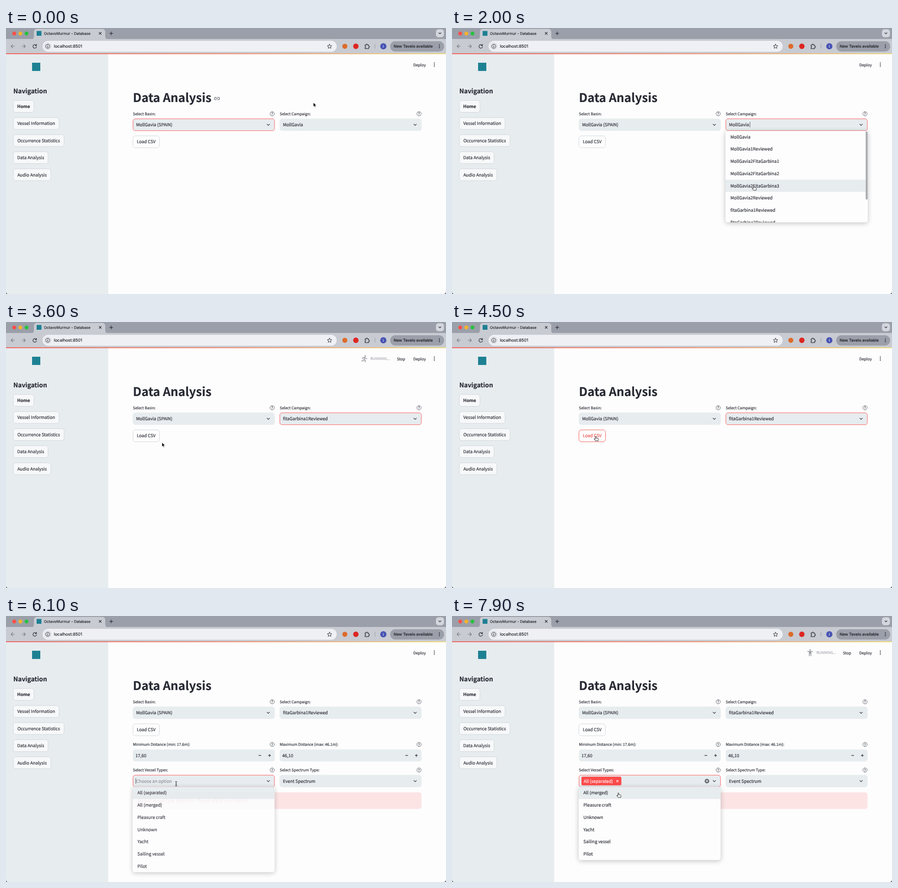
Write an HTML page that moves like this. It is 962 px wide and 582 px high and loops after 8000 ms.

```html
<!DOCTYPE html>
<html lang="en">
<head>
<meta charset="utf-8">
<title>Data Analysis</title>
<style>
html, body { margin: 0; width: 100%; height: 100%; overflow: hidden; background: #55585c; }
svg { display: block; width: 962px; height: 582px; }
text { font: 9.56px "Noto Sans CJK JP", "Noto Sans CJK SC", "Noto Sans CJK", "Noto Sans", sans-serif; color: #272933; fill: currentColor; stroke: currentColor; stroke-width: .18; text-rendering: geometricPrecision; white-space: pre; }
.ui { font-family: Inter, Roboto, sans-serif; color: #222429; }
.small { font-size: 8.36px; }
.line { fill: none; stroke: #292b35; stroke-width: 1.2; stroke-linecap: round; stroke-linejoin: round; }
.shadow { filter: drop-shadow(0 2.7px 5.3px rgba(0, 0, 0, .24)); }
</style>
</head>
<body>
<svg viewBox="0 0 962 582">
  <defs>
    <linearGradient id="bar"><stop stop-color="#f2504b"/><stop offset=".5" stop-color="#ee7b58"/><stop offset="1" stop-color="#e8d470"/></linearGradient>
    <clipPath id="list"><rect x="598" y="225" width="311" height="200.3" rx="5"/></clipPath>
  </defs>
  <g id="base"></g>
  <g id="live"></g>
</svg>
<script>
const LOOP = 8000, ROW = 26.7, GREY = '#e7ecef', RED = '#ff4b4b', LEFT = 277.5, RIGHT = 598.5;
const base = document.getElementById('base'), live = document.getElementById('live');

const PLACE = 'MollGavia', RACE = 'fitaGarbina1Reviewed';
const campaigns = [PLACE, PLACE + '1Reviewed', ...[1, 2, 3].map(n => PLACE + '2FitaGarbina' + n),
  PLACE + '2Reviewed', RACE, 'fitaGarbina2Reviewed'];
const vessels = ['All (separated)', 'All (merged)', 'Pleasure craft', 'Unknown', 'Yacht', 'Sailing vessel', 'Pilot'];

// Moments of the session, in ms
const OPEN_A = 600, PICK_A = 2900, HOVER = 3900, LOADED = 4900, OPEN_B = 5900, PICK_B = 7400;

const rect = (x, y, w, h, fill, r = 0, more = '') =>
  `<rect x="${x}" y="${y}" width="${w}" height="${h}" rx="${r}" fill="${fill}" ${more}/>`;
const circle = (x, y, r, fill, more = '') => `<circle cx="${x}" cy="${y}" r="${r}" fill="${fill}" ${more}/>`;
const text = (x, y, s, more = '') => `<text x="${x}" y="${y}" ${more}>${s}</text>`;
const line = (d, more = '') => `<path class="line" d="${d}" ${more}/>`;
const group = (body, more) => `<g ${more}>${body}</g>`;
const ink = c => `style="color:${c}"`;
const size = (px, weight = 400) => `style="font-size:${px}px;font-weight:${weight}"`;
const cross = (x, y, r, more) => line(`M${x - r} ${y - r}l${2 * r} ${2 * r}m0 ${-2 * r}l${-2 * r} ${2 * r}`, more);
const chevron = (x, y, r = 2.8) => line(`M${x - r} ${y - r / 2}l${r} ${r}l${r} ${-r}`, 'stroke-width="1.5"');
const dots = (x, y, gap) => [-gap, 0, gap].map(d => circle(x, y + d, 1.1, '#292b35')).join('');
const edge = (c, w = .9) => `stroke="${c}" stroke-width="${w}"`;
const fade = (t, start, span) => Math.max(0, Math.min(1, (t - start) / span));

const label = (x, y, s) => text(x, y + 3.1, s, 'class="small"') +
  circle(x + 304.5, y, 4.6, 'none', edge('#50535d')) +
  text(x + 304.5, y + 2.8, '?', `text-anchor="middle" ${size(7)}`);

const select = (x, y, s, focus, color = '#272933') =>
  rect(x + .2, y + .2, 309.4, 26, GREY, 5, edge(focus ? RED : GREY)) +
  text(x + 7, y + 16.7, s, ink(color)) + chevron(x + 296, y + 13.2);

const number = (x, y, s) => rect(x, y, 310, 26.3, GREY, 5.3) + text(x + 5.5, y + 16.5, s) +
  line(`M${x + 275} ${y + 13.2}h5M${x + 296.2} ${y + 13.2}h5m-2.5 -2.5v5`, 'stroke-width="1.4"');

const button = (x, y, w, s, color, weight = 400, bg = '#f7f8f9') =>
  rect(x, y, w, 26, bg, 5.3, edge(color || '#cdd2d7')) +
  text(x + w / 2, y + 16.4, s, `text-anchor="middle" style="font-weight:${weight};color:${color || '#272933'}"`);

function browser() {
  return rect(0, 0, 962, 30, '#9b9fa9') + rect(0, 24, 962, 31.6, '#c8cbd2') +
    ['#fb4f49', '#fdb32b', '#27c13f'].map((c, i) => circle(18 + 13.4 * i, 12, 4.2, c)).join('') +
    '<path fill="#c8cbd2" d="M55 24.5q6 0 6-6V9q0-7 7-7H210q7 0 7 7v9.5q0 6 6 6z"/>' +
    rect(67, 6.5, 10.5, 10.5, '#1d7f93') +
    text(83, 14.6, 'OctavoMurmur - Database', `class="ui" ${size(8.1)}`) +
    cross(206, 11.8, 2.3) + line('M226.5 11.8h7m-3.5 -3.5v7') +
    rect(940, 2.7, 17.5, 17.5, '#d3d6dc', 5.5) + chevron(948.7, 11.7, 2.4) +
    line('M18.5 40h-7.5m3.5-3.5l-3.5 3.5l3.5 3.5', 'style="stroke:#777b84"') +
    line('M35 40h7.5m-3.5-3.5l3.5 3.5l-3.5 3.5', 'style="stroke:#777b84"') +
    line('M66.2 38.2a3.9 3.9 0 1 0 .5 2.8M66.6 35.6v3h-3') +
    rect(80, 28, 643, 24, '#eff0f4', 12) + circle(91.3, 40, 8.3, '#e0e2e8') +
    circle(91.3, 40, 4.5, 'none', edge('#33363d', 1)) + line('M91.3 39.8v2.4M91.3 37.7v.1') +
    text(104.7, 43.3, 'localhost:8501', `class="ui" ${size(9.1)}`) +
    line('M707.4 35.3l1.4 3.1 3.4.4-2.5 2.3.7 3.4-3-1.7-3 1.7.7-3.4-2.5-2.3 3.4-.4z', 'style="stroke-width:1"') +
    circle(740.8, 40, 5.5, '#dc6b2b') + circle(764.9, 40, 5.9, '#dd2622') +
    line('M785 37.2h2.4v-.6a1.4 1.4 0 0 1 2.8 0v.6h2.6v2.6h.6a1.4 1.4 0 0 1 0 2.8h-.6v2.6H785v-2.6a1.4 1.4 0 0 0 0-2.8z') +
    rect(806.3, 35, 1, 10, '#979ba5') + circle(825, 40, 6.8, '#4753b2') +
    text(825, 42.8, 'i', 'class="ui" text-anchor="middle" style="font-size:8px;color:#fff"') +
    rect(840, 29, 118, 22.5, '#9b9fa9', 11.2) +
    text(847.6, 43.1, 'New Tavelo available', `class="ui" ${size(8.5, 500)}`) + dots(947.5, 40, 3.2);
}

function page() {
  const nav = [['Home', 45], ['Vessel Information', 100], ['Occurrence Statistics', 111], ['Data Analysis', 76], ['Audio Analysis', 82]];
  return '<path fill="#fdfdfd" d="M0 55H962V576q0 6-6 6H6q-6 0-6-6z"/>' +
    `<path fill="${GREY}" d="M0 55H223.5V582H6q-6 0-6-6z"/>` + browser() +
    rect(0, 55.4, 962, 1.8, 'url(#bar)') + rect(57, 76, 18, 18, '#1d8193') +
    text(16, 143.2, 'Navigation', size(13.75, 700)) +
    nav.map(([s, w], i) => button(16, 158.5 + 37.4 * i, w, s, '', i ? 400 : 700)).join('') +
    text(890.5, 83.6, 'Deploy', 'class="small"') + dots(936.5, 80, 3.4) +
    text(277.5, 161.7, 'Data Analysis', size(26.2, 700)) +
    label(LEFT, 187.6, 'Select Basin:') + label(RIGHT, 187.6, 'Select Campaign:');
}

function runner(t) {
  const stands = t < 3400 || t > 7600;
  const body = stands
    ? 'M777.8 77.6h10.4M783 78v4M781.3 78v9M784.7 78v9'
    : 'M784.6 77l-1.8 5M784.6 77l-4 .8-1.2 2.6M784.8 77.4l1.6 2.4 2.6.4M782.8 82l2.6 2v3.2M782.6 82.4l-1.4 2.6-3.6.2';
  return circle(stands ? 783 : 785.6, 74.3, 1.6, '#9a9ca3') +
    line(body, 'style="stroke:#9a9ca3;stroke-width:1.7"') +
    text(796.7, 83.4, 'RUNNING...', 'style="font-size:8.1px;color:#a6a8af"') + text(854.8, 83.6, 'Stop', 'class="small"');
}

function status(t) {
  const shown = t < 4300 ? fade(t, 3100, 300) * (1 - fade(t, 3700, 300))
    : t < 6000 ? fade(t, 4600, 200) * (1 - fade(t, 4900, 450))
    : fade(t, 7500, 300);
  return shown ? group(runner(t), `opacity="${shown}"`) : '';
}

function menu(x, y, w, h, items, pad, hover, opacity, extra = {}) {
  const rows = items.map((s, i) => (i === hover ? rect(x, y + ROW * i, w, ROW, GREY) : '') +
    text(x + pad, y + ROW * i + 16.7, s)).join('');
  const panel = rect(x, y, extra.width || w, h, '#fdfdfd', 5, 'class="shadow"');
  return group(panel + group(rows + (extra.bar || ''), extra.clip || ''), `opacity="${opacity}"`);
}

const track = [[0, 672, 163], [500, 658, 214], [1300, 658, 214], [2000, 660, 345], [2500, 661, 397], [2900, 661, 397],
  [3600, 341, 263.5], [4000, 314.5, 250], [5200, 314.5, 250], [5850, 372, 367], [6250, 372, 367], [6700, 364, 387], [LOOP, 364, 387]];
const kinds = [[0, 'arrow'], [400, 'beam'], [1500, 'hand'], [2950, 'arrow'], [3900, 'hand'], [5300, 'arrow'], [5750, 'beam'], [6350, 'hand']];
const shapes = {
  arrow: '<path d="M0 0V9.4L2.2 7.4L3.7 10.8L5.3 10.1L3.8 6.8H6.7Z" fill="#000" stroke="#fff" stroke-width=".8"/>',
  beam: line('M-1.9-4.8Q0-4.8 0-3.4Q0-4.8 1.9-4.8M0-3.4V3.8M-1.9 5.2Q0 5.2 0 3.8Q0 5.2 1.9 5.2M-1 .9h2', 'style="stroke-width:1"'),
  hand: '<path d="M-1.2.6Q-.2-.8.8.6V4l3.8.8q1.2.4 1 1.8l-.8 3.4H-.8l-3-3.8q0-1.4 1.4-.6l1.2.9z" fill="#fff" stroke="#111" stroke-width=".9" stroke-linejoin="round"/>'
};

function pointer(t) {
  const i = track.findIndex(k => k[0] > t);
  const [t0, x0, y0] = track[i - 1], [t1, x1, y1] = track[i];
  const u = (t - t0) / (t1 - t0), e = u * u * (3 - 2 * u);
  return { x: x0 + (x1 - x0) * e, y: y0 + (y1 - y0) * e };
}

function scene(t) {
  const p = pointer(t);
  const openA = t >= OPEN_A && t < PICK_A, openB = t >= OPEN_B, picked = t >= PICK_B;
  const hot = t >= HOVER && t < OPEN_B;
  const hover = top => Math.max(0, Math.floor((p.y - top) / ROW));
  const caret = (x, y, since) => (t - since) % 1000 < 500 ? rect(x, y, .8, 12, '#292b35') : '';
  let out = status(t);

  if (p.y < 174) {
    out += line('M460 151.6h-1.8a2.6 2.6 0 0 0 0 5.2h1.8M462.6 151.6h1.8a2.6 2.6 0 0 1 0 5.2h-1.8M459 154.2h4.6', 'style="stroke:#6c6f78"');
  }
  out += select(LEFT, 198.5, PLACE + ' (SPAIN)', t < OPEN_A) +
    select(RIGHT, 198.5, t < PICK_A ? PLACE : RACE, t >= OPEN_A && t < 4600) +
    button(LEFT, 236, 58, 'Load CSV', hot ? '#f04845' : '', 400, '#fdfdfd');

  if (t >= LOADED) {
    out += label(LEFT, 281, 'Minimum Distance (min: 17.6m):') + label(RIGHT, 281, 'Maximum Distance (max: 46.1m):') +
      number(LEFT, 292, '17,60') + number(RIGHT, 292, '46,10') +
      label(LEFT, 337, 'Select Vessel Types:') + label(RIGHT, 337, 'Select Spectrum Type:') +
      select(LEFT, 348, picked ? '' : 'Choose an option', openB, '#8c9098') + select(RIGHT, 348, 'Event Spectrum') +
      group(rect(LEFT, 385.7, 631, 36.5, '#fce4e5', 5.3) +
        text(288, 407.4, 'Invalid vessel type selection. Please adjust your inputs.', ink('#7d353b')),
        `opacity="${fade(t, 4750, 500)}"`);
  }
  if (openA) {
    out += caret(650.9, 205.5, OPEN_A) + menu(598, 225, 306.5, 200.3, campaigns, 10.7, hover(225), fade(t, 500, 250), {
      width: 311, clip: 'clip-path="url(#list)"',
      bar: t >= 900 ? rect(904.5, 226, 4.2, 149.5, '#a9abae', 2) : ''
    });
  }
  if (openB) {
    const items = vessels.slice(picked ? 1 : 0);
    out += picked
      ? rect(283, 351.6, 87.3, 19, RED, 3) + text(288, 364.7, vessels[0], ink('#fff')) +
        cross(361.6, 361.3, 1.8, 'style="stroke:#fff"') + circle(557.4, 361.2, 5, '#646871') + cross(557.4, 361.2, 1.7, 'style="stroke:#fff"')
      : caret(283.4, 355, OPEN_B);
    out += menu(277, 373.7, 310.3, ROW * items.length, items, 10.3, hover(373.7), fade(t, 5870, 250));
  }
  const kind = kinds.filter(k => k[0] <= t).pop()[1];
  return out + group(shapes[kind], `transform="translate(${p.x} ${p.y})"`);
}

base.innerHTML = page();
let shown = -1;
function frame() {
  const t = Math.floor(performance.now() % LOOP / 100) * 100;
  if (t !== shown) live.innerHTML = scene(shown = t);
  requestAnimationFrame(frame);
}
frame();
</script>
</body>
</html>
```
